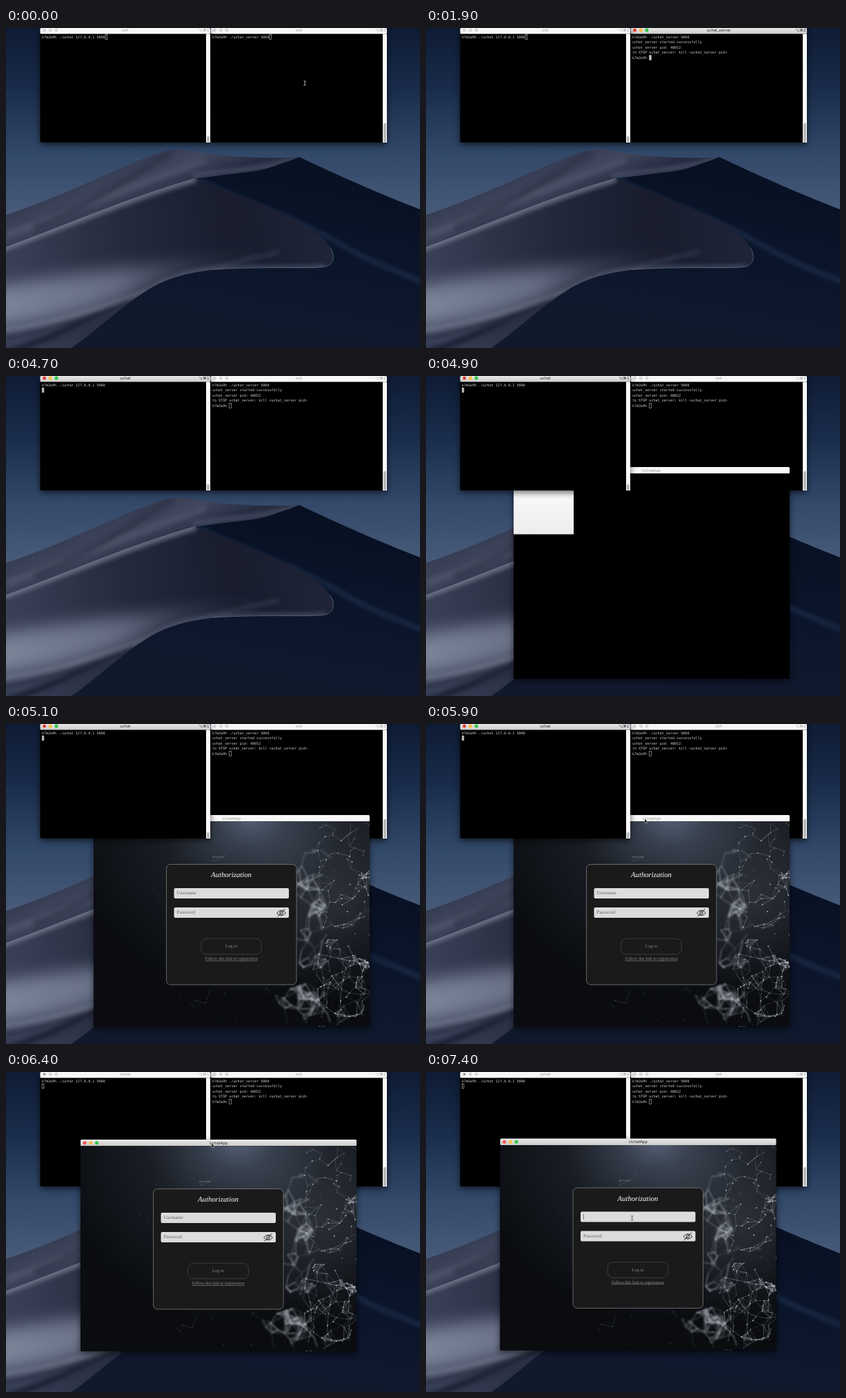
These frames come from a looping animation (600x464 px, 8000 ms). An HTML page:

```html
<!DOCTYPE html>
<html lang="en">
<head>
<meta charset="utf-8">
<title>Chat demo</title>
<style>
html, body { margin: 0; width: 100%; height: 100%; overflow: hidden; background: #101b34; }
svg { position: absolute; left: 0; top: 0; width: 600px; height: 464px; text-rendering: geometricPrecision; }
.win { --on: 0; --job: 0; --ran: 0; --open: 0; --ready: 0; --focus: 0; filter: drop-shadow(0 3px 5px #0009); }

/* state switches, inherited by the parts of each window */
.act { opacity: var(--on); }
.idle { opacity: calc(1 - var(--on)); }
.job { opacity: var(--job); }
.nojob { opacity: calc(1 - var(--job)); }
.ran { opacity: var(--ran); }
.unrun { opacity: calc(1 - var(--ran)); }
.ready { opacity: var(--ready); }
.blank { opacity: calc(1 - var(--ready)); }
.focus { opacity: var(--focus); }
.nofocus { opacity: calc(1 - var(--focus)); }

.title { fill: #222; opacity: calc(.42 + .58 * var(--on)); font: 5.7px Inter, sans-serif; }
.title .key { font: 5.6px "DejaVu Sans", sans-serif; text-anchor: end; }
.mid { text-anchor: middle; }
.mono { fill: #d0d0d0; font: 5.09px "DejaVu Sans Mono", monospace; }
.form { font: 7px "Liberation Serif", serif; fill: #666; }
.form .head { font-size: 10.7px; font-style: italic; fill: #fff; }
.form .button { font-size: 6.4px; fill: #8c8c8c; }
.form .link { font-size: 6.25px; fill: #8c8c8c; text-decoration: underline; }

#right { z-index: 1; animation: right 8s step-end infinite; }
#app { z-index: 2; opacity: var(--open); animation: app 8s step-end infinite, drag 8s linear infinite; }
#left { z-index: 3; animation: left 8s step-end infinite; }
#mouse { z-index: 5; --show: 1; --arrow: 0; --ink: #ddd; opacity: var(--show); animation: pointer 8s step-end infinite; }
#mouse g { animation: move 8s linear infinite; }
#beam { opacity: calc(1 - var(--arrow)); fill: none; stroke: var(--ink); stroke-width: .8; }
#arrow { opacity: var(--arrow); stroke: #fff; stroke-width: .4; }

@keyframes right {
  0% { --on: 0; --ran: 0; --job: 0; }
  1.25% { --on: 1; }
  11.25% { --ran: 1; }
  21.25% { --job: 1; }
  28.75% { --job: 0; }
  37.5%, 100% { --on: 0; --ran: 1; --job: 0; }
}
@keyframes left {
  0% { --on: 0; --ran: 0; --job: 0; }
  37.5% { --on: 1; }
  48.75% { --ran: 1; }
  58.75% { --job: 1; }
  75%, 100% { --on: 0; --ran: 1; --job: 1; }
}
@keyframes app {
  0% { --open: 0; --ready: 0; --on: 0; --focus: 0; z-index: 2; }
  61.25% { --open: 1; }
  62.5% { --ready: 1; }
  75% { --on: 1; z-index: 4; }
  91.25%, 100% { --open: 1; --ready: 1; --on: 1; --focus: 1; z-index: 4; }
}
@keyframes drag {
  0%, 75% { transform: translate(0, 0); animation-timing-function: ease-in-out; }
  80% { transform: translate(-19px, -34px); }
  82.5%, 100% { transform: translate(-19.5px, -35.5px); }
}
@keyframes move {
  0%, 25% { transform: translate(433px, 80px); }
  28.75%, 32.5% { transform: translate(350px, 75px); }
  37.5%, 65% { transform: translate(178px, 67px); animation-timing-function: ease-in-out; }
  72.5%, 75% { transform: translate(317px, 137.5px); animation-timing-function: ease-in-out; }
  80% { transform: translate(298px, 103.5px); }
  82.5%, 83.75% { transform: translate(297.5px, 102px); animation-timing-function: ease-in-out; }
  91.25%, 100% { transform: translate(298.6px, 211.7px); }
}
@keyframes pointer {
  0% { --show: 1; --arrow: 0; --ink: #ddd; }
  11.25% { --show: 0; }
  25% { --show: 1; }
  48.75% { --show: 0; }
  65% { --show: 1; }
  71.25% { --arrow: 1; }
  90%, 100% { --show: 1; --arrow: 0; --ink: #333; }
}
</style>
</head>
<body>
<svg id="desk" viewBox="0 0 600 464">
  <defs>
    <linearGradient id="sky" x2="0" y2="1">
      <stop stop-color="#0e1b34"/><stop offset=".2" stop-color="#1a2d4c"/>
      <stop offset=".4" stop-color="#33496a"/><stop offset=".58" stop-color="#475a79"/>
    </linearGradient>
    <linearGradient id="back" gradientUnits="userSpaceOnUse" x1="150" y1="200" x2="180" y2="270">
      <stop stop-color="#343a50"/><stop offset=".5" stop-color="#41475c"/><stop offset="1" stop-color="#262c41"/>
    </linearGradient>
    <linearGradient id="shade" gradientUnits="userSpaceOnUse" x1="430" y1="190" x2="380" y2="464">
      <stop stop-color="#081022"/><stop offset=".5" stop-color="#0b152a"/><stop offset="1" stop-color="#11192d"/>
    </linearGradient>
    <linearGradient id="face" gradientUnits="userSpaceOnUse" x1="0" y1="340" x2="470" y2="310">
      <stop stop-color="#3a4157"/><stop offset=".4" stop-color="#23283b"/>
      <stop offset=".7" stop-color="#181c2d"/><stop offset="1" stop-color="#1f2437"/>
    </linearGradient>
    <linearGradient id="light" gradientUnits="userSpaceOnUse" x1="0" y1="0" x2="400" y2="0">
      <stop stop-color="#7b8398"/><stop offset=".4" stop-color="#656c82"/><stop offset="1" stop-color="#3a4056" stop-opacity="0"/>
    </linearGradient>
    <linearGradient id="chrome" x2="0" y2="1"><stop stop-color="#e8e8e8"/><stop offset="1" stop-color="#cbcbcb"/></linearGradient>
    <linearGradient id="paper" x2="0" y2="1"><stop stop-color="#fff"/><stop offset="1" stop-color="#ececec"/></linearGradient>
    <radialGradient id="glow" gradientUnits="userSpaceOnUse" cx="355" cy="125" r="270">
      <stop stop-color="#5c677d"/><stop offset=".2" stop-color="#363e4c"/>
      <stop offset=".5" stop-color="#191d24"/><stop offset="1" stop-color="#0a0c10"/>
    </radialGradient>
    <radialGradient id="haze" gradientUnits="userSpaceOnUse" cx="480" cy="250" r="150">
      <stop stop-color="#7a8494" stop-opacity=".22"/><stop offset="1" stop-color="#7a8494" stop-opacity="0"/>
    </radialGradient>
    <filter id="blur" filterUnits="userSpaceOnUse" x="0" y="0" width="600" height="464"><feGaussianBlur stdDeviation="1"/></filter>
    <filter id="soft" filterUnits="userSpaceOnUse" x="-60" y="0" width="720" height="520"><feGaussianBlur stdDeviation="3"/></filter>
    <filter id="mist" filterUnits="userSpaceOnUse" x="-100" y="0" width="800" height="560"><feGaussianBlur stdDeviation="12"/></filter>
    <path id="dune" d="M275 218C180 245 90 285 0 318V464H95C130 440 165 405 205 380C245 355 290 350 340 348C390 346 440 350 463 346C476 342 477 330 470 318C455 292 400 268 340 243C310 232 290 225 275 218Z"/>
    <path id="hill" d="M0 271C80 245 160 203 225 180Q245 174 270 178C300 184 330 187 370 188Q405 189 425 187C395 196 385 205 350 209C320 213 295 214 275 218C180 245 90 285 0 318Z"/>
    <clipPath id="inDune"><use href="#dune"/></clipPath>
    <clipPath id="inHill"><use href="#hill"/></clipPath>
    <clipPath id="inApp"><rect x="127" y="141.5" width="400" height="297.5"/></clipPath>
  </defs>
  <rect width="600" height="464" fill="url(#sky)"/>
  <g id="stars" fill="#c4d0e6"></g>
  <path d="M275 218C320 213 385 205 425 187C480 213 540 240 600 263V464H0V318Z" fill="url(#shade)"/>
  <path d="M275 218C330 247 420 275 475 308S550 345 610 371" fill="none" stroke="#2c4468" stroke-width="6" opacity=".5" filter="url(#soft)"/>
  <use href="#hill" fill="url(#back)"/>
  <g clip-path="url(#inHill)"><g fill="none" filter="url(#soft)">
    <path d="M0 300C110 262 180 230 290 192" stroke="#5b6177" stroke-width="8" opacity=".5"/>
    <path d="M40 290C130 255 180 215 240 180" stroke="#20263c" stroke-width="9" opacity=".45"/>
    <path d="M270 214C330 205 380 205 425 187" stroke="#646a80" stroke-width="5" opacity=".6"/>
  </g></g>
  <use href="#dune" fill="url(#face)"/>
  <g clip-path="url(#inDune)">
    <path d="M-40 382C80 355 190 345 400 325C330 350 240 352 200 378C140 410 70 425 -40 436Z" fill="url(#light)" filter="url(#mist)"/>
    <g fill="none" filter="url(#soft)">
      <path d="M-10 320C90 285 180 245 275 218" stroke="#8f95a8" stroke-width="11" opacity=".6"/>
      <path d="M0 470C60 455 110 425 185 392" stroke="#1d2336" stroke-width="9"/>
      <path d="M-10 452C60 442 130 415 190 386" stroke="#2d3347" stroke-width="5"/>
      <path d="M-10 439C70 428 140 405 205 380" stroke="#858ca0" stroke-width="4" opacity=".7"/>
      <path d="M205 380C245 355 290 350 340 348S440 350 463 346" stroke="#6b738a" stroke-width="7" opacity=".5"/>
      <path d="M250 358C310 345 350 335 395 325" stroke="#565d74" stroke-width="5" opacity=".4"/>
    </g>
  </g>
  <path d="M300 350C390 345 440 350 463 346C476 342 477 330 470 318" fill="none" stroke="#747c92" stroke-width=".8" opacity=".8"/>
  <path d="M0 318C90 285 180 245 275 218" fill="none" stroke="#8b92a6" stroke-width=".8" opacity=".6"/>
</svg>

<svg id="right" class="win" viewBox="0 0 600 464"></svg>

<svg id="app" class="win" viewBox="0 0 600 464">
  <g id="appBar"></g>
  <rect x="127" y="141.5" width="400" height="297.5"/>
  <rect class="blank" x="127" y="141.5" width="87" height="88" fill="url(#paper)"/>
  <g class="ready">
    <rect x="127" y="141.5" width="400" height="297.5" fill="url(#glow)"/>
    <rect x="127" y="141.5" width="400" height="297.5" fill="url(#haze)"/>
    <g clip-path="url(#inApp)" stroke="#c6ccd4" fill="#d5dae0">
      <g id="farNet" filter="url(#blur)"></g>
      <g id="net"></g>
    </g>
    <rect x="232.5" y="203.5" width="188.5" height="174.5" rx="6" fill="#1a1a1a" stroke="#8a8a8a" stroke-width=".7"/>
    <g fill="#dcdcdc">
      <rect x="243.5" y="238" width="166.5" height="15" rx="2"/>
      <rect x="243.5" y="266" width="166.5" height="15" rx="2"/>
    </g>
    <rect x="282.7" y="311.2" width="87.6" height="22.6" rx="8" fill="none" stroke="#555" stroke-width=".6"/>
    <g fill="none" stroke="#333" stroke-width="1">
      <path d="M392.5 274Q399 266.5 405.5 274Q399 281.5 392.5 274ZM393.5 279.5L404.5 268"/>
      <circle cx="399" cy="274" r="2.3"/>
    </g>
    <g class="form">
      <text class="head mid" x="326.5" y="222">Authorization</text>
      <text class="nofocus" x="247.5" y="247.3">Username</text>
      <path class="focus" d="M248 241.5V249.5" stroke="#444" stroke-width=".6"/>
      <text x="247.5" y="275.3">Password</text>
      <text class="button mid" x="326.5" y="324.2">Log in</text>
      <text class="link mid" x="326.5" y="342">Follow this link to registration</text>
    </g>
  </g>
</svg>

<svg id="left" class="win" viewBox="0 0 600 464"></svg>

<svg id="mouse" viewBox="0 0 600 464">
  <g>
    <path id="beam" d="M-1.5 -3.3Q0 -3.3 0 -2.3Q0 -3.3 1.5 -3.3M0 -2.5V2.5M-1.5 3.3Q0 3.3 0 2.3Q0 3.3 1.5 3.3"/>
    <path id="arrow" d="M0 0V6L1.4 4.7L2.4 7L3.4 6.5L2.5 4.4H4.4Z"/>
  </g>
</svg>

<script>
const $ = id => document.getElementById(id);

function seeded(seed) {
  return () => (seed = (seed * 16807) % 2147483647) / 2147483647;
}

function bar(x, y, w, h, title, job, key = '') {
  const shape = `x="${x}" y="${y}" width="${w}" height="${h}" rx="1.5"`;
  const mid = y + h / 2 - (y ? 0 : 1.2);
  const dots = (colors, cls) => colors.map((c, i) =>
    `<circle class="${cls}" cx="${x + 6.1 + i * 8.7}" cy="${mid}" r="2.6" fill="${c}"/>`).join('');
  const label = (cls, text) => `<text class="mid ${cls}" x="${x + w / 2}" y="${mid + 2}">${text}</text>`;
  return `<rect class="idle" ${shape} fill="#f7f7f7"/><rect class="act" ${shape} fill="url(#chrome)"/>`
    + dots(['#dadada', '#dadada', '#dadada'], 'idle')
    + dots(['#fc5753', '#fdbc40', '#33c748'], 'act')
    + `<circle class="job" cx="${x + 6.1}" cy="${mid}" r=".9" fill="#4d1512"/>`
    + `<g class="title">${label('nojob', title)}${label('job', job)}`
    + `<text class="key" x="${x + w - 1.5}" y="${mid + 2}">${key}</text></g>`;
}

const advance = 3.064, pitch = 7.5;

function cursor(x, col, row, cls) {
  const box = `x="${x + col * advance + .3}" y="${9.6 + row * pitch}" width="2.7" height="6.7"`;
  return `<g class="${cls}"><rect ${box} fill="none" stroke="#c9c9c9" stroke-width=".6"/>`
    + `<rect class="act" ${box} fill="#bdbdbd"/></g>`;
}

function terminal({ id, x, w, job, key, thumb, command, output, prompt }) {
  const tx = x + 2.4, end = x + w;
  const line = (text, row) => `<text x="${tx}" y="${14.8 + row * pitch}">${text}</text>`;
  $(id).innerHTML = `<rect x="${x}" y="4" width="${w}" height="162" rx="2"/>`
    + bar(x, 0, w, 8.5, 'zsh', job, key)
    + `<rect x="${end - 6}" y="8.5" width="6" height="157.5" fill="#fafafa"/>`
    + `<rect x="${end - 5}" y="${thumb}" width="4" height="${165.5 - thumb}" rx="1.5" fill="#b9b9b9"/>`
    + `<g class="mono">${line(command, 0)}<g class="ran">${output.map((s, i) => line(s, i + 1)).join('')}</g></g>`
    + cursor(tx, command.length, 0, 'unrun')
    + cursor(tx, prompt, output.length || 1, 'ran');
}

terminal({
  id: 'left', x: 49.5, w: 246.5, job: 'uchat', key: '⌥⌘1', thumb: 157,
  command: 'k7m2w9% ./uchat 127.0.0.1 5000', output: [], prompt: 0
});
terminal({
  id: 'right', x: 296.5, w: 255.5, job: 'uchat_server', key: '⌥⌘2', thumb: 138,
  command: 'k7m2w9% ./uchat_server 5000',
  output: ['uchat_server started successfully', 'uchat_server pid: 40652',
    'to STOP uchat_server: kill &lt;uchat_server pid&gt;', 'k7m2w9%'],
  prompt: 8
});
$('appBar').innerHTML = bar(127, 132, 400, 9.5, 'UchatApp', '');

function drawStars() {
  const rnd = seeded(41);
  $('stars').innerHTML = Array.from({ length: 60 }, () =>
    `<circle cx="${rnd() * 600}" cy="${rnd() * 250}" r="${.25 + rnd() * .35}" opacity="${.25 + rnd() * .6}"/>`).join('');
}

// Scattered points; close ones are joined.
function web(points, reach, width, rnd) {
  return points.map((p, i) => {
    const joins = points.slice(i + 1)
      .filter(q => Math.hypot(p.x - q.x, p.y - q.y) < reach && rnd() < .55)
      .map(q => `M${p.x} ${p.y}L${q.x} ${q.y}`).join('');
    return `<circle cx="${p.x}" cy="${p.y}" r="${.4 + p.glow * .8}" opacity="${p.glow}" stroke="none"/>`
      + `<path d="${joins}" stroke-width="${width}" opacity="${p.glow * .8}"/>`;
  }).join('');
}

function drawNet() {
  const rnd = seeded(977);
  const scatter = (count, x, y, w, h, dim) => Array.from({ length: count }, () =>
    ({ x: x + w * rnd(), y: y + h * rnd(), glow: dim * (.3 + rnd()) }));
  const near = [
    ...scatter(150, 452, 142, 78, 297, .6),
    ...scatter(55, 445, 335, 80, 90, .6),
    ...scatter(24, 200, 370, 240, 65, .3),
    ...scatter(7, 295, 175, 38, 25, .3),
    ...scatter(4, 212, 236, 20, 16, .35)
  ];
  const far = [...scatter(90, 415, 180, 60, 255, .42), ...scatter(30, 390, 380, 80, 55, .35)];
  $('net').innerHTML = web(near, 18, .55, rnd);
  $('farNet').innerHTML = web(far, 20, 1.7, rnd);
}

drawStars();
drawNet();
</script>
</body>
</html>
```
